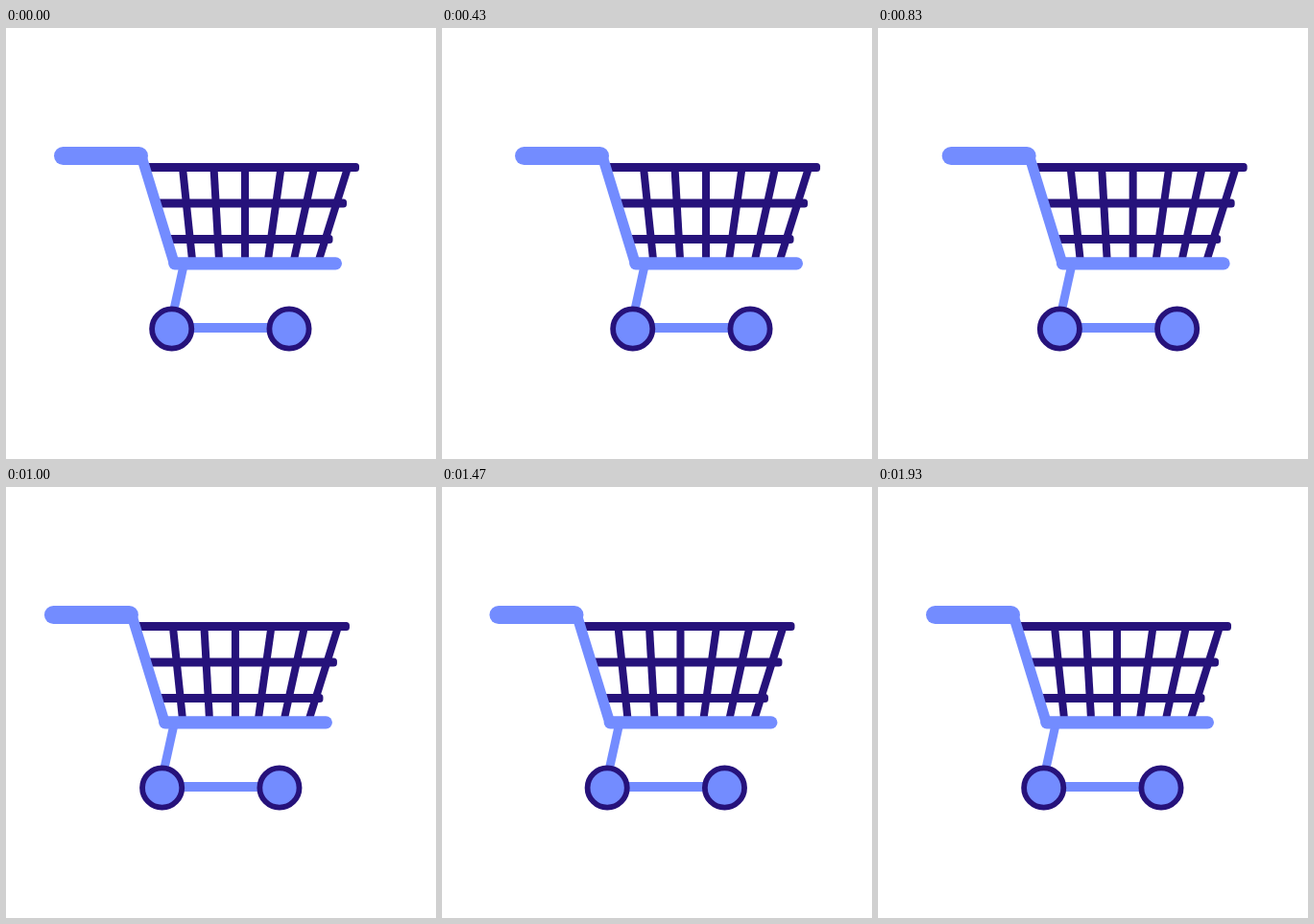
These frames come from a looping animation (448x450 px, 1.96 s). An HTML page with a canvas:

```html
<!DOCTYPE html>
<html lang="en">
<head>
<meta charset="utf-8">
<title>Shopping cart</title>
<style>
  html, body { margin: 0; width: 100%; height: 100%; overflow: hidden; background: #fff; }
  canvas { display: block; width: 448px; height: 450px; }
</style>
</head>
<body>
<canvas id="stage" width="448" height="450"></canvas>
<script>
const ctx = document.getElementById('stage').getContext('2d');
const BLUE = '#738cff', DARK = '#26127b';
const LOOP = 1960, STEP = 100 / 3, LAST = 58;

const smooth = u => u * u * (3 - 2 * u);
// starts gently, still moving at the end
const pull = u => 3 * u * u * (1 - u) * 0.62 + u * u * u;

// Horizontal offset: wind up, push forward, swing back and settle.
function offset(n) {
  if (n < 8) return -4.7 * smooth(n / 8);
  if (n < 17) return -4.7 + 52.7 * smooth((n - 8) / 9);
  if (n < 28) return 48 * (1 - pull((n - 17) / 11));
  const t = (n - 28) / 30;
  return -18.9 * Math.sin(4 * Math.PI * t) * Math.exp(-5 * t);
}

function line(color, width, cap, ...pts) {
  ctx.strokeStyle = color;
  ctx.lineWidth = width;
  ctx.lineCap = cap;
  ctx.lineJoin = 'round';
  ctx.beginPath();
  for (let i = 0; i < pts.length; i += 2) ctx.lineTo(pts[i], pts[i + 1]);
  ctx.stroke();
}

function rail(x, y, right) {
  ctx.fillStyle = DARK;
  ctx.beginPath();
  ctx.roundRect(x, y - 4.5, right - x, 9, 3.5);
  ctx.fill();
}

function wheel(x) {
  ctx.beginPath();
  ctx.arc(x, 314, 20.6, 0, 2 * Math.PI);
  ctx.fillStyle = BLUE;
  ctx.fill();
  ctx.strokeStyle = DARK;
  ctx.lineWidth = 5.8;
  ctx.stroke();
}

function drawCart() {
  const slats = [[184, 194], [216.5, 222], [249, 249], [286.5, 273], [321, 300], [356, 326]];
  for (const [top, bottom] of slats) line(DARK, 8, 'butt', top, 146, bottom, 242);
  rail(144, 145.5, 368);
  rail(156, 183, 355);
  rail(168, 220.5, 340.5);

  line(BLUE, 9, 'butt', 185.5, 246, 174.5, 296);
  line(BLUE, 10, 'butt', 185, 313, 282, 313);
  line(BLUE, 11, 'round', 142, 137, 175.3, 245.8);
  line(BLUE, 13.2, 'round', 175.8, 245.8, 343.4, 245.8);
  line(BLUE, 19, 'round', 59.5, 133.5, 138.5, 133.5);

  wheel(172.7);
  wheel(295);
}

function draw(now) {
  const t = now % LOOP;
  // steps begin on the nearest hundredth of a second
  const n = Math.min(LAST, Math.floor((Math.floor(t / 10) * 10 + 5) / STEP));
  ctx.setTransform(1, 0, 0, 1, 0, 0);
  ctx.fillStyle = '#fff';
  ctx.fillRect(0, 0, 448, 450);
  ctx.translate(offset(n), 0);
  drawCart();
}

const start = performance.now();
function tick() {
  draw(performance.now() - start);
  requestAnimationFrame(tick);
}
tick();
</script>
</body>
</html>
```
